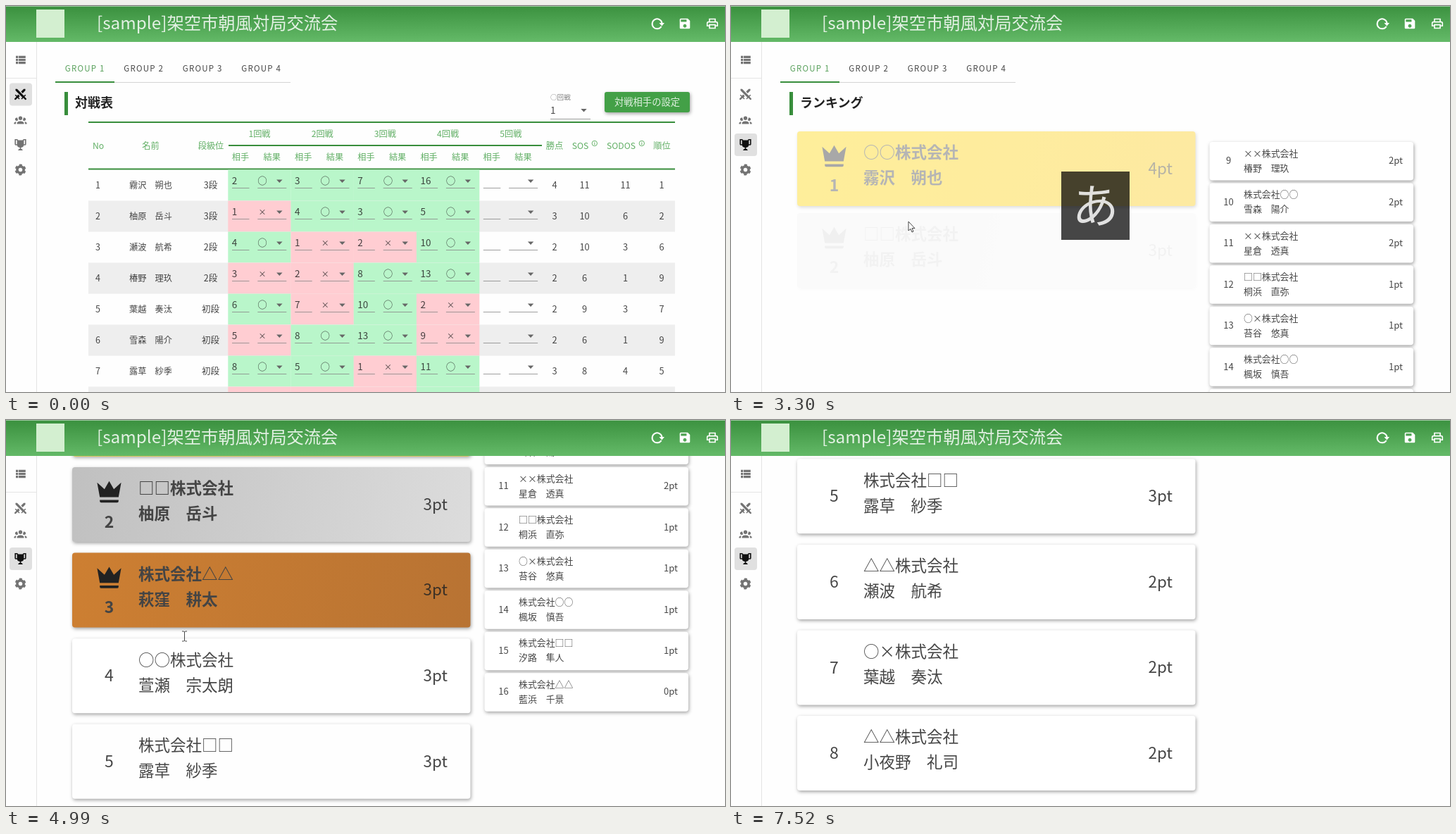
An HTML page that plays this animation: 1021 px wide and 548 px high, repeating every 8250 ms.

```html
<!DOCTYPE html>
<html lang="ja">
<head>
<meta charset="utf-8">
<style>
html, body { margin: 0; height: 100%; overflow: hidden; background: #fefefe; }
svg { display: block; width: 100vw; height: 100vh; font-family: "Noto Sans CJK JP", "Noto Sans CJK", sans-serif; font-weight: 300; fill: #222; }
text { fill-opacity: .84; }
.m { text-anchor: middle; }
.e { text-anchor: end; }
.r { font-weight: 400; }
.b { font-weight: 700; fill-opacity: 1; }
.g { fill: #43a047; font-weight: 400; }
.tab { letter-spacing: 1.2px; font-weight: 400; }
.card { filter: drop-shadow(1px 2px 2.5px rgba(0, 0, 0, .36)); }
</style>
</head>
<body>
<svg id="stage" viewBox="0 0 1021 548"></svg>
<script>
const LOOP = 8250, GREEN = '#388e3c';
const players = ['霧沢　朔也', '柚原　岳斗', '瀬波　航希', '椿野　理玖', '葉越　奏汰', '雪森　陽介', '露草　紗季'];
const games = [
  '2○ 3○ 7○ 16○', '1× 4○ 3○ 5○', '4○ 1× 2× 10○', '3× 2× 8○ 13○',
  '6○ 7× 10○ 2×', '5× 8○ 13○ 9×', '8○ 5○ 1× 11○', '7× 6× 4× 12○'];
const scores = ['4 11 11 1', '3 10 6 2', '2 10 3 6', '2 6 1 9', '2 9 3 7', '2 6 1 9', '3 8 4 5'];
const ranking = [
  ['○○株式会社', players[0], 4], ['□□株式会社', players[1], 3],
  ['株式会社△△', '萩窪　耕太', 3], ['○○株式会社', '萱瀬　宗太朗', 3],
  ['株式会社□□', players[6], 3], ['△△株式会社', players[2], 2],
  ['○×株式会社', players[4], 2], ['△△株式会社', '小夜野　礼司', 2],
  ['××株式会社', players[3], 2], ['株式会社○○', players[5], 2],
  ['××株式会社', '星倉　透真', 2], ['□□株式会社', '桐浜　直弥', 1],
  ['○×株式会社', '苔谷　悠真', 1], ['株式会社○○', '楓坂　慎吾', 1],
  ['株式会社□□', '汐路　隼人', 1], ['株式会社△△', '藍浜　千景', 0]];

const icons = {
  save: 'M17 3H5c-1.11 0-2 .9-2 2v14c0 1.1.89 2 2 2h14c1.1 0 2-.9 2-2V7l-4-4zm-5 16c-1.66 0-3-1.34-3-3s1.34-3 3-3 3 1.34 3 3-1.34 3-3 3zm3-10H5V5h10v4z',
  print: 'M19 8h-1V3H6v5H5c-1.66 0-3 1.34-3 3v6h4v4h12v-4h4v-6c0-1.66-1.34-3-3-3zM8 5h8v3H8V5zm8 12v2H8v-4h8v2zm2-2v-2H6v2H4v-4c0-.55.45-1 1-1h14c.55 0 1 .45 1 1v4h-2z',
  list: 'M4 14h4v-4H4zm0 5h4v-4H4zM4 9h4V5H4zm5 5h12v-4H9zm0 5h12v-4H9zM9 5v4h12V5z',
  swords: 'M6.2 2.44L18.1 14.34 20.22 12.22 21.63 13.63 19.16 16.1 22.34 19.28Q23 20 22.34 20.7L21.63 21.4Q21 22 20.22 21.4L17 18.23 14.56 20.7 13.15 19.29 15.27 17.17 3.37 5.27V2.44zM15.89 10L20.63 5.26V2.44H17.8L13.06 7.18zM10.94 15L8.11 12.13 5.9 14.34 3.78 12.22 2.37 13.63 4.84 16.1 1.66 19.29Q1 20 1.66 20.7L2.37 21.41Q3 22 3.78 21.41L7 18.23 9.44 20.7 10.85 19.29 8.73 17.17z',
  people: 'M12 5.5a3.5 3.5 0 0 1 0 7a3.5 3.5 0 0 1 0-7M5 8q.8 0 1.53.42q-.2 2.3 1.13 3.96A3 3 0 1 1 5 8M19 8a3 3 0 1 1-2.66 4.38q1.33-1.66 1.13-3.96Q18.2 8 19 8M5.5 18.25c0-2.07 2.9-3.75 6.5-3.75s6.5 1.68 6.5 3.75V20h-13zM0 20v-1.5c0-1.4 1.9-2.56 4.45-2.9q-.95 1.1-.95 2.65V20zM24 20h-3.5v-1.75q0-1.55-.95-2.65c2.56.34 4.45 1.5 4.45 2.9z',
  trophy: 'M18 2c-.9 0-2 1-2 2H8c0-1-1.1-2-2-2H2v9c0 1 1 2 2 2h2.2c.4 2 1.7 3.7 4.8 4v2.08C8 19.54 8 22 8 22h8s0-2.46-3-2.92V17c3.1-.3 4.4-2 4.8-4H20c1 0 2-1 2-2V2zM6 11H4V4h2zm14 0h-2V4h2z',
  crown: 'M5 16L3 5l5.5 5L12 4l3.5 6L21 5l-2 11zm14 3q0 1-1 1H6q-1 0-1-1v-1h14z'
};

const text = (x, cy, size, str, cls = '', more = '') =>
  `<text x="${x}" y="${cy + size * .37}" font-size="${size}" class="${cls}" ${more}>${str}</text>`;
const rect = (x, y, w, h, fill, more = '') =>
  `<rect x="${x}" y="${y}" width="${w}" height="${h}" fill="${fill}" ${more}/>`;
const icon = (name, x, y, scale = .81, more = '') =>
  `<path d="${icons[name]}" fill-rule="evenodd" transform="translate(${x} ${y}) scale(${scale}) translate(-12 -12)" ${more}/>`;
const arrow = (x, y) => `<path d="M${x - 4.2} ${y - 2}h8.4l-4.2 4.4z" fill="#666"/>`;
const gradient = (id, from, to, dir) =>
  `<linearGradient id="${id}" ${dir}><stop stop-color="${from}"/><stop offset="1" stop-color="${to}"/></linearGradient>`;
const times = (n, fn) => Array.from({ length: n }, (_, i) => fn(i)).join('');

function tabs() {
  return times(4, i => text(112.2 + 83.5 * i, 89, 11.5, 'GROUP ' + (i + 1), 'tab m', i ? '' : `fill="${GREEN}"`)) +
    rect(153, 108, 251, 1, '#d4d4d4') + rect(70, 107, 84, 2, GREEN);
}

function heading(str) {
  return rect(83, 122, 5, 33, GREEN) + text(98, 137.5, 18, str, 'b');
}

function info(x) {
  return `<circle cx="${x}" cy="195" r="3.7" fill="none" stroke="#43a047" stroke-width=".8"/>` +
    rect(x - .4, 194.5, .9, 2.6, '#43a047') + rect(x - .4, 192.8, .9, .9, '#43a047');
}

function tableHead() {
  const cols = [[131, 'No'], [205.5, '名前'], [291, '段級位'], [779, '勝点'], [815.5, 'SOS'], [873.5, 'SODOS'], [931.5, '順位']];
  return rect(117, 164, 833, 2, GREEN) + rect(316, 197, 445, 2, GREEN) + rect(117, 230.5, 833, 2, GREEN) +
    cols.map(([x, s]) => text(x, 198, 12.2, s, 'g m')).join('') + info(835.8) + info(902.8) +
    times(5, k => text(360 + 89.2 * k, 181, 12.2, k + 1 + '回戦', 'g m') +
      text(333 + 89.2 * k, 214, 12.2, '相手', 'g m') + text(377.7 + 89.2 * k, 214, 12.2, '結果', 'g m'));
}

function row(i) {
  const y = 232.5 + 44 * i, mid = y + 21.5;
  const level = i < 2 ? '3段' : i < 4 ? '2段' : '初段';
  let out = i % 2 ? rect(117, y, 833, 44, '#eee') : '';
  for (let k = 0; k < 5; k++) {
    const x = 315.3 + 89.2 * k, game = games[i].split(' ')[k];
    if (game) {
      const mark = game.slice(-1), won = mark == '○';
      out += rect(x, y, 89.4, 44, won ? '#b9f6ca' : '#ffcdd2') +
        text(x + 5.5, y + 16, 13.5, game.slice(0, -1), 'r') + text(x + 48.7, y + 16, won ? 13.5 : 11, mark, 'm');
    }
    out += rect(x + 5.7, y + 25.5, 24.5, .8, '#888') + rect(x + 42, y + 25.5, 41, .8, '#888') + arrow(x + 73, y + 16);
  }
  if (players[i]) {
    out += text(130.5, mid, 12.5, i + 1, 'm r') + text(205.5, mid, 12.2, players[i], 'm') + text(290.5, mid, 12.5, level, 'm');
    scores[i].split(' ').forEach((s, k) => out += text([779, 821.5, 879.5, 931][k], mid, 12.8, s, 'm r'));
  }
  return out;
}

function table() {
  return heading('対戦表') + text(773, 129.5, 9.6, '○回戦', '', 'fill="#666"') + text(773, 148, 13.5, '1', 'r') +
    arrow(820.5, 148) + rect(773, 160, 57, .8, '#888') +
    rect(850, 122, 121, 29, '#43a047', 'rx="3" class="card"') +
    text(910.5, 136.5, 13.3, '対戦相手の設定', 'm r', 'fill="#fff" fill-opacity="1"') + tableHead() + times(8, row);
}

function bigCard([firm, name, points], i) {
  const top = i < 3, cls = top ? 'b' : '', tint = top ? 'fill="#444"' : '';
  return '<g class="big">' + rect(94, 0, 565.5, 106, top ? `url(#medal${i})` : '#fff', 'rx="4" class="card"') +
    (top ? icon('crown', 146.5, 35, 1.9) : '') +
    text(146.5, top ? 77 : 52.5, 23, i + 1, 'm ' + (top ? 'b' : 'r'), tint) +
    text(188, 30, 22.5, firm, cls, tint) + text(188, 66, 22.5, name, cls, tint) +
    text(627, 52.5, 22.5, points + 'pt', 'e') + '</g>';
}

function smallCard([firm, name, points], i) {
  const y = 193 + 58.45 * i;
  return rect(679.5, y, 289.5, 54.5, '#fff', 'rx="4" class="card"') + text(706.5, y + 26.5, 13, i + 9, 'm r') +
    text(728, y + 16, 12.9, firm) + text(728, y + 37, 12.9, name) + text(954, y + 26.5, 13, points + 'pt', 'e r');
}

function gear(y) {
  const ring = (r, w, dash) => `<circle r="${r}" fill="none" stroke="currentColor" stroke-width="${w}" ${dash}/>`;
  return `<g transform="translate(20.5 ${y}) rotate(14)">` + ring(4.6, 3.6, '') + ring(6.6, 2.6, 'stroke-dasharray="3.9 3.01"') + '</g>';
}

const navY = [76.5, 125.5, 161.5, 197, 232.5];
const nav = rect(0, 51, 43, 497, '#fefefe') + rect(43, 51, 1, 497, '#e4e4e4') + rect(0, 102, 43, 1, '#e4e4e4') +
  rect(5, 0, 32, 32, '#f4f4f4', 'rx="4" id="hover"') + rect(5, 0, 32, 32, '#e0e0e0', 'rx="4" id="active"') +
  ['list', 'swords', 'people', 'trophy', 'gear'].map((n, i) => '<g class="nav" fill="currentColor">' +
    (n == 'gear' ? gear(navY[i]) : icon(n, 20.5, navY[i], n == 'people' ? .76 : .81)) + '</g>').join('');

const header = rect(0, 0, 1021, 51, 'url(#bar)') + rect(0, 0, 1021, 1, '#fff', 'opacity=".5"') +
  rect(43, 5, 40, 40, '#d3efd0') +
  text(129, 24, 24.3, '[sample]架空市朝風対局交流会', '', 'fill="#fff"') + '<g fill="#fff">' +
  '<path d="M930.6 29A7 7 0 1 1 931.5 24" fill="none" stroke="#fff" stroke-width="2"/><path d="M927.5 24h7.5l-3.7 4.5z"/>' +
  icon('save', 964, 25) + icon('print', 1003, 25) + '</g>';

// arrow, hand, text beam
const cursors = `<g stroke="#333" stroke-width=".9" fill="#fff">
<path class="cur" d="M0 0v13l3-2.6 2 4.6 2-.9-2-4.5h4z"/>
<path class="cur" d="M-1 1q1.3-1.6 2.4 0V6q1.2-.8 2.2.3 1.2-.7 2 .4 1.8-.5 2 1v4l-1.5 5h-6L-4 11q-.5-2 1.2-1.6L-1 10.5z"/>
<path class="cur" d="M-3.5-7h2.5l1 1 1-1h2.5M0-6V6M-3.5 7h2.5l1-1 1 1h2.5" fill="none"/></g>`;

const stage = document.getElementById('stage');
const diagonal = 'gradientUnits="userSpaceOnUse" x1="94" y1="0" x2="659" y2="106"';
stage.innerHTML = '<defs>' + gradient('bar', '#3a903e', '#63b967', 'x2=".04" y2="1"') +
  gradient('medal0', '#ffd700', '#fdcb12', diagonal) + gradient('medal1', '#c0c0c0', '#dcdcdc', diagonal) +
  gradient('medal2', '#cd7f32', '#b87333', diagonal) + '</defs>' +
  `<g id="page">${tabs()}<g id="table">${table()}</g><g id="ranks">${heading('ランキング')}` +
  ranking.slice(0, 8).map(bigCard).join('') + ranking.slice(8).map(smallCard).join('') + '</g></g>' +
  nav + header + '<g id="ime">' + rect(469, 235, 97, 97, '#000', 'opacity=".72"') +
  text(517.5, 284, 66, 'あ', 'm', 'fill="#fff"') + '</g>' + cursors;

const $ = id => document.getElementById(id);
const all = cls => [...document.getElementsByClassName(cls)];
const [bigCards, navIcons, pointers] = ['big', 'nav', 'cur'].map(all);
const show = (el, on) => el.style.display = on ? '' : 'none';
const clamp = v => Math.max(0, Math.min(1, v));

// CSS "ease": solve the bezier for its parameter
function ease(p) {
  let s = p;
  for (let i = 0; i < 8; i++) s -= (.75 * s * (1 - s) + s ** 3 - p) / (.75 - 1.5 * s + 3 * s * s);
  return .3 * s * (1 - s) ** 2 + 3 * s * s * (1 - s) + s ** 3;
}
const smooth = p => p * p * (3 - 2 * p);

const SWITCH = 2940, notches = [3706, 4010, 4780, 5110, 5430, 5750, 5880, 6010];
const scrollAt = t => Math.min(619.5, notches.reduce((sum, s) => sum + 81 * smooth(clamp((t - s) / 210)), 0));

const path = [
  [300, 894, 550], [700, 420, 330], [1070, 130, 208], [1140, 128, 210], [1350, 32, 198], [1550, 40, 230],
  [1690, 46, 231], [2050, 172, 264], [2490, 40, 229], [2560, 23, 222], [2640, 23, 222], [2780, 21, 195],
  [2980, 21, 195], [3270, 252, 306], [6500, 252, 306], [6750, 540, 430], [7000, 860, 311],
  [7080, 860, 311], [7200, 945, 398], [7370, 946, 399], [7520, 955, 552]];
function cursorAt(t) {
  const i = path.findIndex(p => p[0] > t);
  if (i < 1) return [0, -50];
  const [a, b] = [path[i - 1], path[i]], p = (t - a[0]) / (b[0] - a[0]);
  return [a[1] + (b[1] - a[1]) * p, a[2] + (b[2] - a[2]) * p];
}

function draw(t) {
  const ranks = t >= SWITCH, [x, y] = cursorAt(t);
  show($('table'), !ranks);
  show($('ranks'), ranks);
  show($('ime'), t > 3000 && t < 3440);
  $('page').setAttribute('transform', `translate(0 ${-scrollAt(t)})`);
  bigCards.forEach((card, i) => {
    const p = ease(clamp((t - 3000 - 210 * i) / 1250));
    card.setAttribute('transform', `translate(0 ${188.4 + 121.6 * i - 17 * (1 - p)})`);
    card.setAttribute('opacity', p);
  });

  const active = ranks ? 3 : 1;
  const hover = x < 37 ? navY.findIndex(c => Math.abs(y + 4 - c) < 16) : -1;
  navIcons.forEach((g, i) => g.style.color = i == active ? '#111' : '#737373');
  $('active').setAttribute('y', navY[active] - 16);
  show($('hover'), hover >= 0);
  if (hover >= 0) $('hover').setAttribute('y', navY[hover] - 16);

  const kind = hover >= 0 ? 1 : t > 4790 && t < 6530 ? 2 : 0;
  pointers.forEach((c, i) => {
    show(c, i == kind);
    c.setAttribute('transform', `translate(${x + (i == 2 ? 1.5 : 0)} ${y + (i == 2 ? 1 : 0)})`);
  });
}

function tick() {
  draw(performance.now() % LOOP);
  requestAnimationFrame(tick);
}
tick();
</script>
</body>
</html>
```
